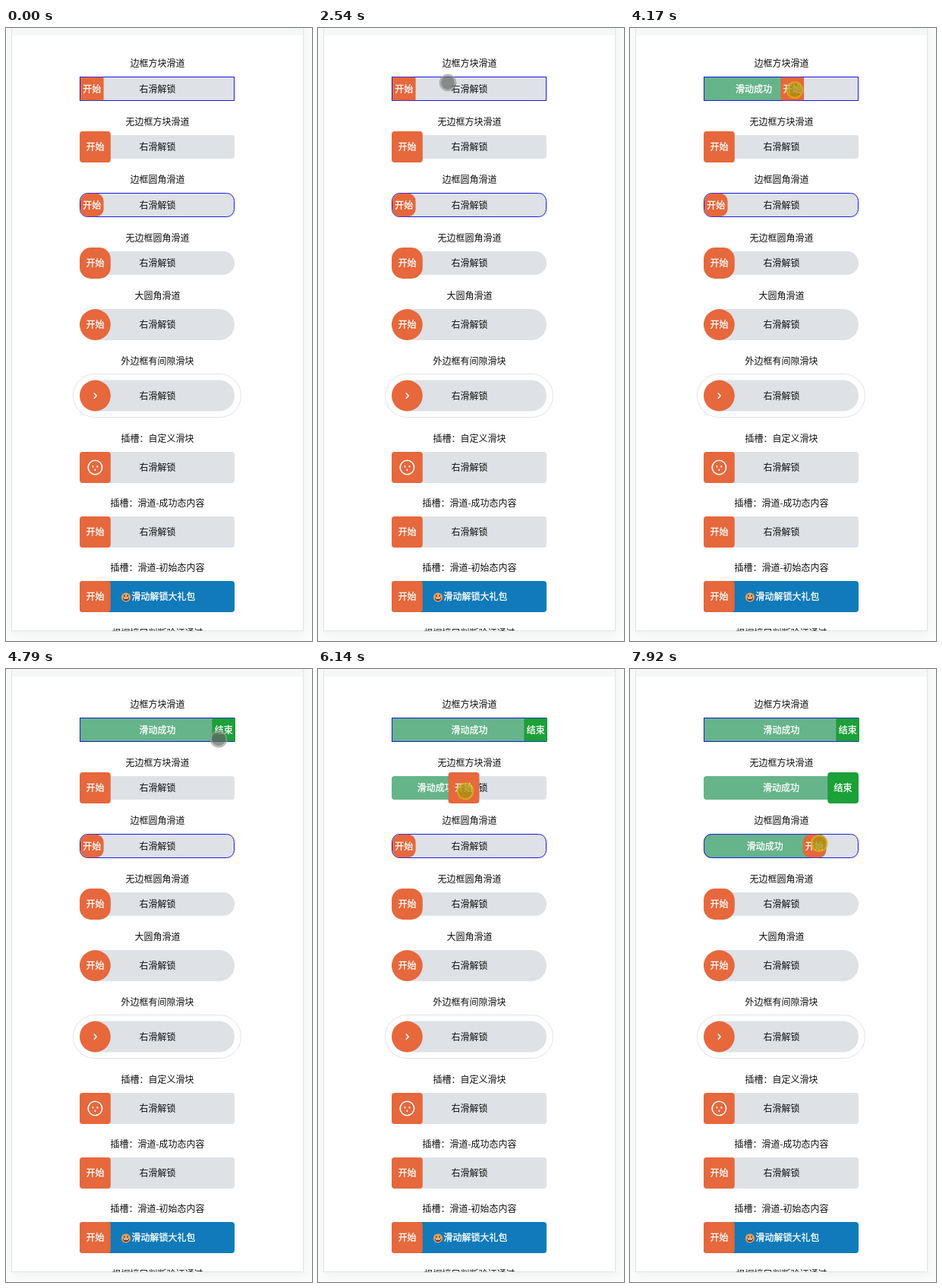
Recreate the animation shown at these times as an HTML page. Size 403 by 807 pixels, loop 7.99 s.

```html
<!DOCTYPE html>
<html lang="zh-CN">
<head>
<meta charset="utf-8">
<title>滑动解锁</title>
<style>
  html, body { margin: 0; width: 100%; height: 100%; overflow: hidden; background: #fafbfb; }
  svg { display: block; width: 403px; height: 807px; }
  text { font: 12px "Noto Sans CJK SC", "Noto Sans CJK", sans-serif; text-anchor: middle; fill: #111; }
  .white { fill: #fff; stroke: #fff; stroke-width: .3px; }
</style>
</head>
<body>
<svg viewBox="0 0 403 807">
  <defs>
    <clipPath id="card"><rect x="8" y="10" width="383" height="783.5"/></clipPath>
    <filter id="blur" x="-10%" y="-10%" width="120%" height="120%"><feGaussianBlur stdDeviation="6"/></filter>
  </defs>
  <rect width="403" height="807" fill="#fafbfb"/>
  <rect x="8" y="-30" width="384" height="828" fill="#e9ebeb" opacity=".6" filter="url(#blur)"/>
  <rect x="7.5" y="-5" width="384" height="798.5" fill="#fff" stroke="#dfe6e7"/>
  <rect x="8" y="0" width="383" height="10" fill="#f6f8f8"/>
  <g id="rows" clip-path="url(#card)"></g>
  <g id="cursor">
    <circle id="halo" r="10.2" fill="none" stroke-width="2.4"/>
    <circle id="dot" r="9"/>
  </g>
</svg>
<script>
const LOOP = 7990, LEFT = 97, WIDTH = 204, MID = 199.5, RING = 8;
const ORANGE = '#e6683c', GREEN = '#1ca038', FILL = '#66b48a', GRAY = '#dee1e6';
const NS = 'http://www.w3.org/2000/svg';
const $ = id => document.getElementById(id);

function add(parent, tag, attrs = {}, text) {
  const el = document.createElementNS(NS, tag);
  for (const k in attrs) el.setAttribute(k, attrs[k]);
  if (text) el.textContent = text;
  return parent.appendChild(el);
}
const box = (g, x, y, width, height, rx, fill, more) =>
  add(g, 'rect', { x, y, width, height, rx, fill, ...more });
const label = (g, x, mid, text, cls = '') =>
  add(g, 'text', { x, y: Math.round(mid + 4.6), class: cls }, text);

// Track height, knob size and knob start of the three slider kinds
const framed = { h: 32, knob: 30.6, x0: LEFT + 1, border: true };
const thin = { h: 31, knob: 40.8, x0: LEFT };
const tall = { h: 41, knob: 40.8, x0: LEFT };

const rows = [
  { ...framed, title: '边框方块滑道', top: 64, r: 0, grab: [3580, 4700] },
  { ...thin, title: '无边框方块滑道', top: 141, r: 4, grab: [5260, 7180] },
  { ...framed, title: '边框圆角滑道', top: 217, r: 10, grab: [7560, LOOP] },
  { ...thin, title: '无边框圆角滑道', top: 294, r: 15 },
  { ...tall, title: '大圆角滑道', top: 370, r: 20.4 },
  { ...tall, title: '外边框有间隙滑块', top: 463.5, r: 20.4, icon: drawArrow, ring: RING },
  { ...tall, title: '插槽：自定义滑块', top: 558, r: 4, icon: drawFace },
  { ...tall, title: '插槽：滑道-成功态内容', top: 643, r: 4 },
  { ...tall, title: '插槽：滑道-初始态内容', top: 728, r: 4, gift: true }
];

function drawArrow(g, x, y) {
  add(g, 'path', { d: `M${x - 1.6} ${y - 3.4}l3.4 3.6-3.4 3.6`, fill: 'none', stroke: '#fff', 'stroke-width': 1.5 });
}

function drawFace(g, x, y) {
  const line = { fill: 'none', stroke: '#fff', 'stroke-width': 1.6 };
  add(g, 'circle', { cx: x, cy: y, r: 9.2, ...line });
  add(g, 'path', { d: `M${x - 3} ${y - 2.4}v2.4M${x + 3} ${y - 2.4}v2.4M${x} ${y + 2}v2.6`, ...line });
}

function drawEmoji(g, x, y) {
  add(g, 'circle', { cx: x, cy: y, r: 6, fill: '#eba15c' });
  add(g, 'path', { d: `M${x - 2.2} ${y - 3}v2M${x + 2.2} ${y - 3}v2`, stroke: '#4b3329', 'stroke-width': 1.5 });
  add(g, 'path', { d: `M${x - 4} ${y + .6}h8a4 4 0 0 1-8 0z`, fill: '#5b3430' });
  box(g, x - 3, y + .8, 6, 1.2, 0, '#fff');
}

function addFill(row, g, i) {
  const mid = row.top + row.h / 2;
  row.clip = add(add(g, 'clipPath', { id: 'clip' + i }), 'rect', { x: LEFT, y: row.top, height: row.h, rx: row.r });
  row.fill = add(g, 'g', { 'clip-path': `url(#clip${i})` });
  box(row.fill, LEFT, row.top, WIDTH + 1, row.h, 0, FILL);
  row.done = label(row.fill, MID, mid, '滑动成功', 'white');
}

function buildRow(row, i) {
  const g = add($('rows'), 'g'), { top, h, r, knob, ring = 0 } = row, mid = top + h / 2;
  label(g, MID, top - ring - 17.4, row.title);
  if (ring) {
    box(g, LEFT - ring - .5, top - ring, WIDTH + 2 * ring + 1, h + 2 * ring, r + ring, 'none', { stroke: '#e1e3e6' });
  }
  box(g, LEFT, top, WIDTH, h, r, row.gift ? '#107abb' : GRAY);
  if (row.gift) {
    drawEmoji(g, 158, mid + 1);
    label(g, 207.5, mid, '滑动解锁大礼包', 'white');
  } else label(g, MID, mid, '右滑解锁');
  if (row.grab) addFill(row, g, i);
  if (row.border) box(g, LEFT + .5, top + .5, WIDTH - 1, h - 1, r, 'none', { stroke: '#1a1ae6' });

  row.handle = add(g, 'g', { transform: `translate(${row.x0})` });
  row.face = box(row.handle, 0, mid - knob / 2, knob, knob, Math.max(r, 2), ORANGE);
  if (row.icon) row.icon(row.handle, knob / 2, mid);
  else row.word = label(row.handle, knob / 2, mid, '开始', 'white');
}

// Pointer hops; bow bends the way sideways, free hops slow down at their end
const origin = { x: 294, y: 609 };
const hops = [
  { from: 720, to: 1330, x: 332, y: 404, bow: 40 },
  { from: 1470, to: 2090, x: 121, y: 65, bow: 24 },
  { from: 2280, to: 3020, x: 207, y: 77 },
  { from: 3160, to: 3580, x: 116.5, y: 80 },
  { from: 3580, to: 4700, x: 302, y: 83, drag: true },
  { from: 4760, to: 5260, x: 119.5, y: 159 },
  { from: 5260, to: 5600, x: 160, y: 160, drag: true },
  { from: 5600, to: 6830, x: 243, y: 162, drag: true },
  { from: 6830, to: 7180, x: 310, y: 163, drag: true },
  { from: 7220, to: 7560, x: 119.5, y: 231 },
  { from: 7560, to: 8120, x: 302, y: 229, drag: true }
];

function pointer(t) {
  let { x, y } = origin;
  for (const hop of hops) {
    if (t <= hop.from) break;
    const u = Math.min(1, (t - hop.from) / (hop.to - hop.from));
    const e = hop.drag ? u * u * (3 - 2 * u) : u * (2 - u);
    x += (hop.x - x) * e + (hop.bow || 0) * Math.sin(Math.PI * u);
    y += (hop.y - y) * e;
  }
  return { x, y };
}

function moveRow(row, t) {
  const [press, release] = row.grab, max = row.x0 + WIDTH - row.knob;
  const pulled = t > press ? pointer(Math.min(t, release)).x - pointer(press).x : 0;
  const x = Math.min(max, row.x0 + pulled), w = x + row.knob - LEFT, finished = x === max;
  row.handle.setAttribute('transform', `translate(${x})`);
  row.fill.setAttribute('visibility', pulled > .1 ? 'visible' : 'hidden');
  row.clip.setAttribute('width', w);
  row.done.setAttribute('x', LEFT + w / 2);
  row.face.setAttribute('fill', finished ? GREEN : ORANGE);
  row.word.textContent = finished ? '结束' : '开始';
}

rows.forEach(buildRow);
label($('rows'), MID, 796.5, '根据接口判断验证通过');
const sliders = rows.filter(row => row.grab);

function render(t) {
  sliders.forEach(row => moveRow(row, t));
  const { x, y } = pointer(t);
  const down = sliders.some(({ grab: [a, b] }) => t >= a && t < b);
  $('cursor').setAttribute('visibility', t >= 790 ? 'visible' : 'hidden');
  $('cursor').setAttribute('transform', `translate(${x} ${y})`);
  $('dot').setAttribute('fill', down ? 'rgba(166,150,12,.75)' : 'rgba(100,100,100,.7)');
  $('halo').setAttribute('stroke', down ? 'rgba(212,180,20,.8)' : 'rgba(150,150,150,.65)');
}

const start = performance.now();
function tick() {
  render((performance.now() - start) % LOOP);
  requestAnimationFrame(tick);
}
tick();
</script>
</body>
</html>
```
